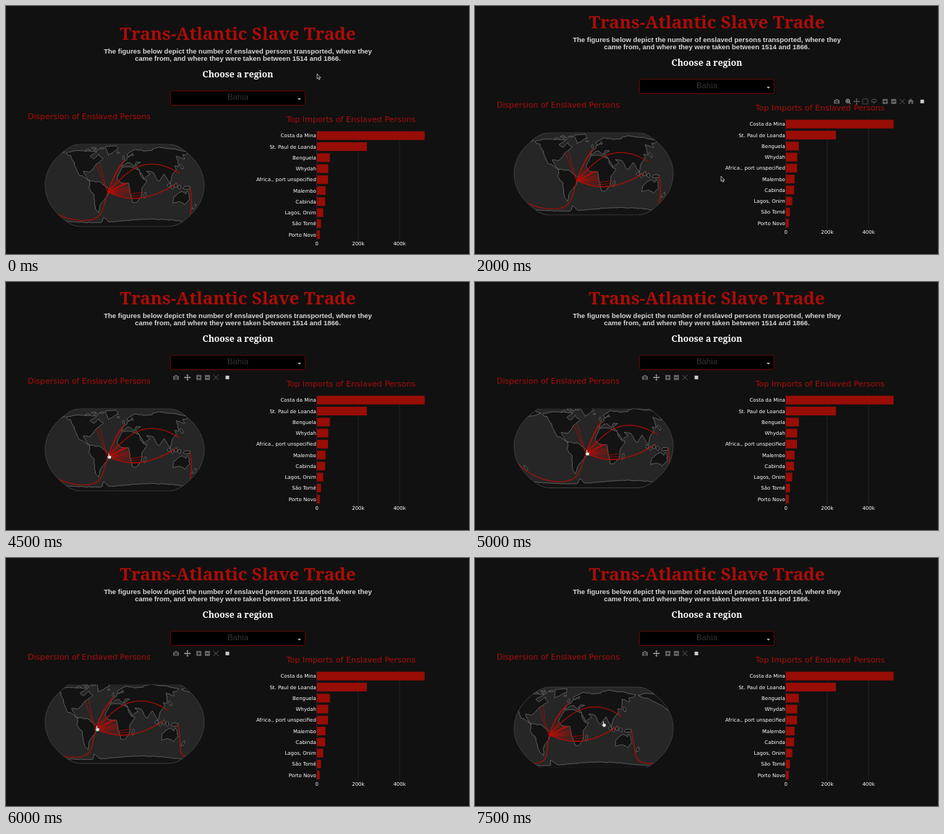
An HTML page with a canvas for the animation above (8 s loop, 640 by 344 pixels).

```html
<!DOCTYPE html>
<html lang="en">
<head>
<meta charset="utf-8">
<title>Trade figures</title>
<style>
  html, body { margin: 0; width: 100%; height: 100%; overflow: hidden; background: #111; }
  #page, #page > *, #pointer { position: absolute; left: 0; top: 0; width: 640px; height: 344px; }
  svg { overflow: visible; }
  .serif { font-family: Georgia, "Noto Serif", serif; font-weight: 700; }
  .sans { font-family: Arial, "Liberation Sans", sans-serif; }
  .plot { font-family: Verdana, "DejaVu Sans", sans-serif; }
  .mid { text-anchor: middle; }
  .red { fill: #ab0d08; }
  .icon { fill: none; stroke: #636363; }
  .on { stroke: #b4b4b4; }
  .solid { fill: #636363; stroke: none; }
  .cut { stroke: #111; }
  .badge { fill: #ccc; stroke: none; }
</style>
</head>
<body>
<div id="page">
  <canvas id="map"></canvas>
  <svg viewBox="0 0 640 344">
    <defs>
      <g id="camera"><path class="solid" d="M-4-2h2l1-1.5h2l1 1.5h2v5h-8z"/><circle class="cut" r="1.4" cy=".4"/></g>
      <path id="pan" d="M-4 0h8M0-4v8M-3-1l-1 1 1 1M3-1l1 1-1 1M-1-3l1-1 1 1M-1 3l1 1 1-1"/>
      <g id="minus"><path class="solid" d="M-3.5-3.5h7v7h-7z"/><path class="cut" d="M-2 0h4"/></g>
      <g id="plus"><use href="#minus"/><path class="cut" d="M0-2v4"/></g>
      <path id="fit" d="M-3.5-3.5l7 7M3.5-3.5l-7 7" stroke-width=".9"/>
      <path id="badge" class="badge" d="M-2.5-2.5h5v5h-5z"/>
      <g id="zoom"><circle cx="-.5" cy="-.6" r="2.6"/><path d="M1.5 1.4l2 2.200M-1.800-.6h2.600M-.5-1.900v2.600"/></g>
      <path id="select" d="M-3.500-3.500h7v7h-7z" stroke-dasharray="1.5 .8"/>
      <path id="lasso" d="M-1 1.500c-3-1-3-4 1-4.500s5 3 1.500 4.200c-2 .5-2.500-.5-2-1s1.500 1 .5 3"/>
      <path id="home" class="solid" d="M-4.500 0L0-4 4.500 0H3.300V3.500H1V1H-1V3.500H-3.300V0z"/>
    </defs>

    <text class="serif mid red" x="320.5" y="47" font-size="24.2">Trans-Atlantic Slave Trade</text>
    <g class="sans mid" font-size="9.5" font-weight="700" fill="#d6d6d6">
      <text x="320.5" y="65.5">The figures below depict the number of enslaved persons transported, where they</text>
      <text x="320.5" y="76">came from, and where they were taken between 1514 and 1866.</text>
    </g>
    <text class="serif mid" x="320.5" y="99" font-size="12.2" fill="#fff">Choose a region</text>

    <rect x="227.3" y="117.8" width="186" height="19.8" rx="2" fill="#000" stroke="#6c0d09" stroke-width=".9"/>
    <text class="sans mid" x="320.5" y="130.2" font-size="11.4" fill="#333">Bahia</text>
    <path d="M403 128h5l-2.5 2.6z" fill="#bbb"/>

    <g class="plot red">
      <text x="30" y="157" font-size="10.9">Dispersion of Enslaved Persons</text>
      <text class="mid" x="477" y="161" font-size="11.05">Top Imports of Enslaved Persons</text>
    </g>
    <g id="chart" class="plot" font-size="6.95" fill="#fff"></g>
    <g id="barTools" class="icon"></g>
    <g id="mapTools" class="icon"></g>
  </svg>
</div>
<svg id="pointer" viewBox="0 0 640 344">
  <path id="arrow" d="M0 0V7L1.6 5.6 2.7 8.2 3.9 7.7 2.8 5.3H5Z" fill="#111" stroke="#e4e4e4" stroke-width=".7"/>
  <path id="hand" d="M-.7 0Q.1-.8.8 0V2.600L3 3.200Q3.800 3.500 3.600 4.600L3 7.200H-.3L-2.300 4.600Q-2 3.500-.7 4.200Z" fill="#fff" stroke="#222" stroke-width=".5"/>
</svg>

<script>
const $ = id => document.getElementById(id);
const LOOP = 8000, STEP = 500, RAD = Math.PI / 180;
const lerp = (a, b, f) => a + (b - a) * f;
const clamp = (v, lo, hi) => Math.max(lo, Math.min(hi, v));

// --- toolbars: icons 11.8 apart, with wider gaps between groups ---
function toolbar(id, x, groups) {
  let html = "";
  for (const group of groups) {
    for (const name of group.split(" ")) {
      const active = name.endsWith("*");
      html += `<use href="#${name.replace("*", "")}" x="${x}" y="148.4" class="${active ? "on" : ""}"/>`;
      x += 11.8;
    }
    x += 4;
  }
  $(id).innerHTML = html;
}
toolbar("barTools", 500, ["camera", "zoom* pan select lasso", "plus minus fit home", "badge"]);
toolbar("mapTools", 235, ["camera", "pan*", "plus minus fit", "badge"]);

// --- bar chart ---
const ZERO = 429.7, PER_K = 0.2859;
const bars = {
  "Costa da Mina": 521, "St. Paul de Loanda": 242, "Benguela": 63, "Whydah": 55, "Africa., port unspecified": 54,
  "Malembo": 42, "Cabinda": 40, "Lagos, Onim": 31, "São Tomé": 20, "Porto Novo": 14
};
let chart = "";
for (const k of [0, 200, 400]) {
  const x = ZERO + k * PER_K;
  chart += `<path d="M${x} 172V325" stroke="#272d34" stroke-width=".7"/>
    <text class="mid" x="${x}" y="332.3">${k ? k + "k" : 0}</text>`;
}
Object.entries(bars).forEach(([name, k], i) => {
  const y = 179.8 + i * 15.25;
  chart += `<rect x="${ZERO}" y="${y - 6}" width="${k * PER_K}" height="12" fill="#980d06"/>
    <text x="428.8" y="${y + 2.5}" text-anchor="end">${name}</text>`;
});
$("chart").innerHTML = chart;

// --- coastlines: a few capes and bays as lon, lat; the shore between them is fractal ---
const capes = {
  northAmerica: [-168,66, -125,70, -95,68, -82,67, -94,58, -80,52, -72,62, -56,52, -70,42, -81,26, -97,27,
    -90,19, -79,8, -105,20, -124,42, -150,60],
  southAmerica: [-79,9, -52,5, -35,-7, -40,-21, -58,-37, -69,-54, -74,-46, -70,-18, -81,-5],
  africa: [-6,36, 11,36, 33,31, 43,12, 51,11, 40,-4, 39,-17, 27,-34, 18,-33, 12,-14, 9,4, -8,5, -17,14],
  eurasia: [-9,37, -2,46, 9,57, 24,59, 22,64, 12,56, 6,61, 25,71, 70,70, 104,77, 185,67, 160,60, 157,52,
    140,58, 129,36, 121,38, 122,30, 108,18, 103,3, 92,22, 78,8, 67,25, 51,28, 58,21, 44,13, 34,31, 27,39,
    40,45, 30,46, 23,37, 13,45, 3,43],
  australia: [114,-23, 130,-12, 140,-17, 143,-11, 153,-28, 146,-38, 131,-32, 116,-35],
  greenland: [-45,60, -54,70, -65,80, -30,83, -20,72]
};

let seed = 7;
const random = () => (seed = seed * 16807 % 2147483647) / 2147483647 - 0.5;

// Midpoint displacement between two points.
function ragged(a, b, depth) {
  if (!depth) return [a];
  const amp = Math.min(4, Math.hypot(b[0] - a[0], b[1] - a[1]) * 0.22);
  const mid = a.map((v, i) => (v + b[i]) / 2 + amp * random());
  return [...ragged(a, mid, depth - 1), ...ragged(mid, b, depth - 1)];
}
function shore(flat) {
  const pts = flat.flatMap((v, i) => i % 2 ? [] : [[v, flat[i + 1]]]);
  return pts.flatMap((p, i) => ragged(p, pts[(i + 1) % pts.length], 3));
}
function island(lon, lat, w, h) {
  return Array.from({ length: 9 }, (_, i) => {
    const r = 1 + 0.5 * random(), a = i * 40 * RAD;
    return [lon + w * r * Math.cos(a), lat + h * r * Math.sin(a)];
  });
}

const lands = Object.values(capes).map(shore);
lands.push(island(47, -19, 2.3, 6), island(-3, 54, 2.5, 4), island(-19, 65, 4, 1.3),
  island(138, 37, 3, 4.5), island(172, -42, 3, 4.5), island(141, -5, 8, 3));
for (let i = 0; i < 4; i++) {
  lands.push(island(100 + i * 8, -i % 2 * 3, 3, 4));
  lands.push(island(-112 + i * 13, 71 + i % 2 * 5, 7, 2));
}
const ice = Array.from({ length: 121 }, (_, i) => {
  const lon = i * 3 - 180;
  return [lon, -72 + 4 * Math.cos((lon - 80) * RAD) + 11 * Math.exp(-(((lon + 60) / 7) ** 2)) + 1.5 * random()];
});

// --- voyages: great circles from one harbour to stretches of coast ---
const HOME = [-38.5, -13];
const coasts = [ // first port, last port, number of lines
  [[-71, 42], [-63, 45], 2], [[-9, 38], [1, 51], 4], [[-16, 14], [-10, 7], 3],
  [[-2, 5], [9, 4], 6], [[9, -1], [14, -13], 6], [[34, -25], [42, -13], 3],
  [[128, 23], [125, 25], 2], [[113, 0], [120, 4], 2], [[147, -3], [148, -5], 2]
];
const vec = ([lon, lat]) => [Math.cos(lat * RAD) * Math.cos(lon * RAD),
  Math.cos(lat * RAD) * Math.sin(lon * RAD), Math.sin(lat * RAD)];

function greatCircle(from, to) {
  const a = vec(from), b = vec(to), out = [], N = 60;
  const w = Math.acos(a[0] * b[0] + a[1] * b[1] + a[2] * b[2]);
  let last = from[0];
  for (let i = 0; i <= N; i++) {
    const p = Math.sin(w * (1 - i / N)), q = Math.sin(w * i / N);
    const [x, y, z] = a.map((v, k) => (v * p + b[k] * q) / Math.sin(w));
    let lon = Math.atan2(y, x) / RAD;
    lon += 360 * Math.round((last - lon) / 360);
    last = lon;
    out.push([lon, Math.asin(clamp(z, -1, 1)) / RAD]);
  }
  return out;
}
const voyages = coasts.flatMap(([a, b, n]) => Array.from({ length: n }, (_, i) =>
  greatCircle(HOME, a.map((v, k) => lerp(v, b[k], i / (n - 1))))));

// --- map: Natural Earth projection, panned by longitude and by height ---
const SCALE = 40.2, CX = 164, CY = 248.8, TOP = 191.6, TALL = 114.8;
const DEG_PER_PX = 1 / (SCALE * 0.86 * RAD);
const OCEAN = "#262626", LAND = "#131313", COAST = "#888";
const ctx = $("map").getContext("2d"), dpr = window.devicePixelRatio || 1;
$("map").width = 640 * dpr;
$("map").height = 344 * dpr;

function project(lon, lat, dy) {
  const p = lat * RAD, p2 = p * p, p4 = p2 * p2;
  const kx = 0.8707 - 0.131979 * p2 + p4 * (-0.013791 + p4 * (0.003971 * p2 - 0.001529 * p4));
  const ky = 1.007226 + p2 * (0.015085 + p4 * (-0.044475 + 0.028874 * p2 - 0.005916 * p4));
  return [CX + SCALE * lon * RAD * kx, CY + dy - SCALE * p * ky];
}

function drawMap(turn, dy) {
  const trace = (pts, shift = 0) => {
    ctx.beginPath();
    for (const [lon, lat] of pts) ctx.lineTo(...project(lon + shift, lat, dy));
  };
  const fill = color => { ctx.fillStyle = color; ctx.fill(); };
  const stroke = (color, width) => { ctx.strokeStyle = color; ctx.lineWidth = width; ctx.stroke(); };
  const side = Array.from({ length: 61 }, (_, i) => [180, i * 3 - 90]);
  const globe = [...side, ...side.map(([lon, lat]) => [-lon, -lat])];
  const turns = [-360, 0, 360].map(s => s + turn);

  ctx.setTransform(dpr, 0, 0, dpr, 0, 0);
  ctx.clearRect(0, 0, 640, 344);
  ctx.lineJoin = "round";
  ctx.save();
  ctx.beginPath();
  ctx.rect(52, TOP, 224, TALL);
  ctx.clip();
  ctx.save();
  trace(globe);
  fill(OCEAN);
  ctx.clip();
  for (const s of turns) {
    for (const land of lands) {
      trace(land, s);
      ctx.closePath();
      fill(LAND);
      stroke(COAST, 0.6);
    }
    trace([...ice, [180, -90], [-180, -90]], s);
    fill(LAND);
    trace(ice, s);
    stroke(COAST, 0.6);
  }
  for (const s of turns) for (const v of voyages) {
    trace(v, s);
    stroke("rgba(184,14,6,.62)", 1.1);
  }
  ctx.restore();
  trace(globe);
  ctx.closePath();
  stroke("#484848", 0.8);
  ctx.restore();
}

// --- motion, counted in half-second steps ---
const path = [ // step, x, y of the pointer
  [0, 430, 94], [1, 429, 94], [2, 402, 121], [3, 340, 236], [4, 340, 236], [5, 230, 225], [6, 182, 214],
  [7, 157.5, 230], [8, 164, 238], [9, 142, 238], [10, 154.5, 233.5], [12, 125.5, 233], [13, 107, 245],
  [14, 206, 212], [14.6, 186, 227], [15, 177.5, 227]
];
const drags = [[9, 12.7], [14.6, 15]];
const SCROLL_AT = 4, TOOLS_SWAP = 5;

function pointerAt(t) {
  const i = clamp(path.findIndex(p => p[0] > t), 1, path.length) ;
  const a = path[i - 1], b = path[i];
  const f = (t - a[0]) / (b[0] - a[0]);
  return [lerp(a[1], b[1], f), lerp(a[2], b[2], f)];
}
path.push([16, 177.5, 227]);

// The map follows the pointer while it is held.
function panAt(t) {
  let dx = 0, dy = 0;
  for (const [from, to] of drags) {
    const a = pointerAt(from), b = pointerAt(clamp(t, from, to));
    dx += b[0] - a[0];
    dy += b[1] - a[1];
  }
  return [dx, dy];
}

let shown = -1;
function frame() {
  const t = Math.floor(performance.now() % LOOP / STEP);
  if (t !== shown) {
    shown = t;
    const [x, y] = pointerAt(t), [dx, dy] = panAt(t);
    const held = drags.some(([from, to]) => t >= from && t <= Math.ceil(to));
    $("page").style.transform = `translateY(${t < SCROLL_AT ? 0 : -16}px)`;
    $("barTools").style.opacity = t < 3 ? 0 : clamp((TOOLS_SWAP + 1 - t) / 2, 0, 0.5) * 2;
    $("mapTools").style.opacity = clamp((t - TOOLS_SWAP + 1) / 2, 0, 1);
    $("arrow").style.display = held ? "none" : "";
    $("hand").style.display = held ? "" : "none";
    $(held ? "hand" : "arrow").setAttribute("transform", `translate(${x} ${y})`);
    drawMap(dx * DEG_PER_PX, dy);
  }
  requestAnimationFrame(frame);
}
frame();
</script>
</body>
</html>
```
